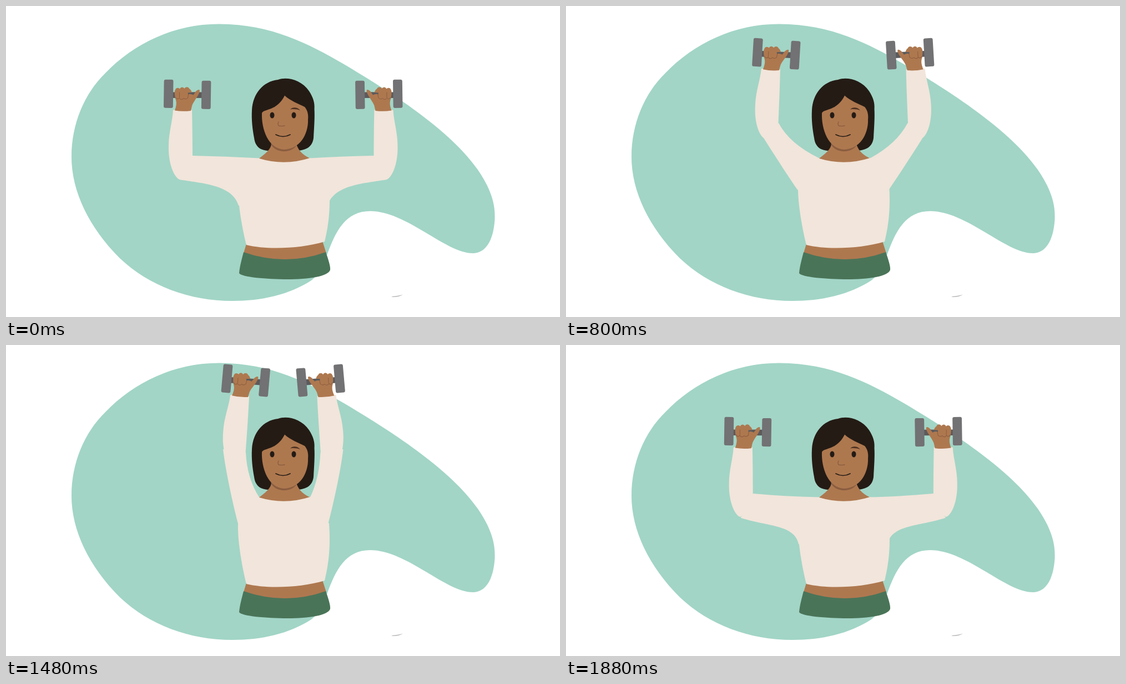
Recreate the animation shown at these times as an HTML page with a canvas. Size 998x561 px, loop 1920 ms.

```html
<!DOCTYPE html>
<html lang="en">
<head>
<meta charset="utf-8">
<title>Shoulder press</title>
<style>
html, body { margin: 0; width: 998px; height: 561px; overflow: hidden; background: #fff; }
canvas { display: block; }
</style>
</head>
<body>
<canvas id="stage" width="998" height="561"></canvas>
<script>
const ctx = document.getElementById('stage').getContext('2d');
const LOOP = 1920, STEP = 40, RAD = Math.PI / 180;
const SKIN = '#ae784f', SHADE = '#8b5d40', SHIRT = '#f2e5db', HAIR = '#241b15';

const shape = d => new Path2D(d);
const blob = shape('M385 32.5C478 33 545 68 607 104C689 152.5 800 223 850 295.5C872 328 882 355 880.5 385' +
  'C878 425 863 446 841 446C792 446 722 370 656 370C612 370 594 405 578 450C572 470 562 486 550 495' +
  'C510 521 460 532 408 532C330 532 258 505 205 455C150 400 118 335 118 272C118 213 141 158 179 121' +
  'C231 67 304 32 385 32.5Z');
const mark = shape('M694 524Q706 523 715 520.5Q708 525 697 525Z');
const hair = shape('M474 261C460 261 449 255 447 238C444 222 442 205 443 188C444.5 158 463 136 490 133' +
  'C506 127 532 133 546 153.5C553.5 165 556.5 175 555.5 186C556.5 200 555 220 554 238C552 254 541 260 524 261Z');
const neck = shape('M478 249C477 259 466 267 456 275L475 290H528L548 275C538 270 528 264 523 249Z');
const neckShade = shape('M477 248C484 267 518 267 525 248Z');
const face = shape('M502 161.5C512 171 528 177 538 182C543 188 545 195 544 205C545 222 536 257 501 259' +
  'C472 257 460 222 461 193C465 185 488 190 502 161.5Z');
const brow = shape('M512 186.5C516 181.5 526 182 530 188.5C525 186 518 185.5 512 186.5Z');
const nose = shape('M491 209C489 213 490 217 494 216.5Q498 217 502 216');
const mouth = shape('M486 232Q499 239 512 232');
const waist = shape('M433 429L428 446Q503 472 577 446L570 424Z');
const shorts = shape('M428 444Q503 470 576 444C580 455 585 470 584 476C580 488 545 493 507 493' +
  'C470 493 424 489 420 482C421 470 425 455 428 444Z');
const torso = shape('M456 275Q502 289 548 274L582 322C584 352 584 385 574 425C530 438 470 440 433 431' +
  'C424 395 417 350 418 322Z');

const forearm = shape('M301 187.5L335 187.5Q336 230 336 290L314 313C306 313 292 290 293 252C293 228 300 208 301 187.5Z');
const hand = shape('M304 188.5C307 180 308 174 305 167C304 160 303 154 305 151C306 147 311 147 313 149.5' +
  'C315 145.5 319 145.5 321.5 149C323 145 329 145.5 330 149C333 151 334 153 335 157L340 156C343 153 345 150.5 348 151' +
  'C350 152.5 348 157 346 161C342 168 337 174 335 180L333 189Q318 191 304 188.5Z');
const barGap = shape('M327.5 156.5L341 155.5L337.5 160.5Q331 157.5 328 160Z');
const knuckles = shape('M305.5 165Q309 170 312 166Q316 171 320 166.5Q324 169.5 327 166' +
  'M312.5 156L312.5 165M328.5 160L327.5 166');

// Upper arm outline per pose: inner elbow, inner curve, outer elbow, two curve handles, armpit.
const lifts = [0, 0.291, 0.624, 0.802, 0.98];
const outlines = [
  [336, 270, 396, 271, 312, 313, 352, 320, 408, 322, 419, 360],
  [352, 238, 412, 265, 331, 273, 395, 317, 413, 326, 418, 345],
  [385, 210, 404, 249, 349, 222, 365, 250, 395, 298, 417, 331],
  [407, 201, 424, 253, 369, 205, 384, 243, 402, 288, 418, 327],
  [432, 194, 434, 240, 391, 188, 395, 225, 410, 292, 418, 322]
];

function outlineAt(p) {
  const weights = lifts.map((a, i) =>
    lifts.reduce((w, b, j) => i === j ? w : w * (p - b) / (a - b), 1));
  return outlines[0].map((_, k) => weights.reduce((sum, w, i) => sum + w * outlines[i][k], 0));
}

function fill(path, color) {
  ctx.fillStyle = color;
  ctx.fill(path);
}

function stroke(path, color, width) {
  ctx.strokeStyle = color;
  ctx.lineWidth = width;
  ctx.stroke(path);
}

function oval(x, y, rx, ry, color) {
  ctx.fillStyle = color;
  ctx.beginPath();
  ctx.ellipse(x, y, rx, ry, 0, 0, Math.PI * 2);
  ctx.fill();
}

function plate(x, y) {
  ctx.save();
  ctx.translate(x, y);
  ctx.rotate(0.8 * RAD);
  ctx.fillStyle = '#727173';
  ctx.beginPath();
  ctx.roundRect(-8.4, -25.6, 16.8, 51.2, 3);
  ctx.fill();
  ctx.restore();
}

function drawArm(p, neckX) {
  const [ix, iy, cx, cy, ox, oy, ax, ay, bx, by, px, py] = outlineAt(p);
  ctx.fillStyle = SHIRT;
  ctx.beginPath();
  ctx.moveTo(ix, iy);
  ctx.quadraticCurveTo(cx, cy, neckX, 274.5);
  ctx.lineTo(475, 330);
  ctx.lineTo(px + 6, py);
  ctx.lineTo(px, py);
  ctx.bezierCurveTo(bx, by, ax, ay, ox, oy);
  ctx.fill();

  // The forearm rides on the elbow, which swings around the shoulder.
  const angle = (78.4 - 67.7 * p) * RAD;
  ctx.save();
  ctx.translate(439.6 - 124.1 * Math.sin(angle), 312.9 - 124.1 * Math.cos(angle));
  ctx.rotate(4.3 * p * RAD);
  ctx.translate(-318, -288);
  ctx.fillStyle = '#5b5a5c';
  ctx.fillRect(300, 155.5, 54, 10.5);
  plate(292.7, 158.4);
  plate(360.6, 160.4);
  fill(forearm, SHIRT);
  fill(hand, SKIN);
  fill(barGap, '#5b5a5c');
  stroke(knuckles, SHADE, 1);
  ctx.restore();
}

function drawHead() {
  fill(hair, HAIR);
  fill(neck, SKIN);
  fill(neckShade, SHADE);
  fill(face, SKIN);
  fill(brow, '#4b3122');
  oval(479.5, 197, 4, 5.5, HAIR);
  oval(518.5, 197, 4, 5.5, HAIR);
  stroke(nose, SHADE, 1.4);
  stroke(mouth, HAIR, 1.7);
}

const ease = (t, start, length) => {
  const s = Math.min(1, Math.max(0, (t - start) / length));
  return s * s * (3 - 2 * s);
};

function draw(time) {
  const t = Math.floor((time % LOOP) / STEP) * STEP;
  const lift = ease(t, 480, 560) - ease(t, 1440, 480);
  ctx.fillStyle = '#fff';
  ctx.fillRect(0, 0, 998, 561);
  fill(blob, '#a2d5c6');
  fill(mark, '#b5b5b5');
  drawHead();
  fill(waist, SKIN);
  fill(shorts, '#4a7458');
  drawArm(lift, 456);
  ctx.save();
  ctx.translate(998.5, 0);
  ctx.scale(-1, 1);
  drawArm(lift, 450.5);
  ctx.restore();
  fill(torso, SHIRT);
}

ctx.lineCap = ctx.lineJoin = 'round';
let begin;
function tick(now) {
  begin ??= now;
  draw(Math.max(0, now - begin));
  requestAnimationFrame(tick);
}
draw(0);
requestAnimationFrame(tick);
</script>
</body>
</html>
```
